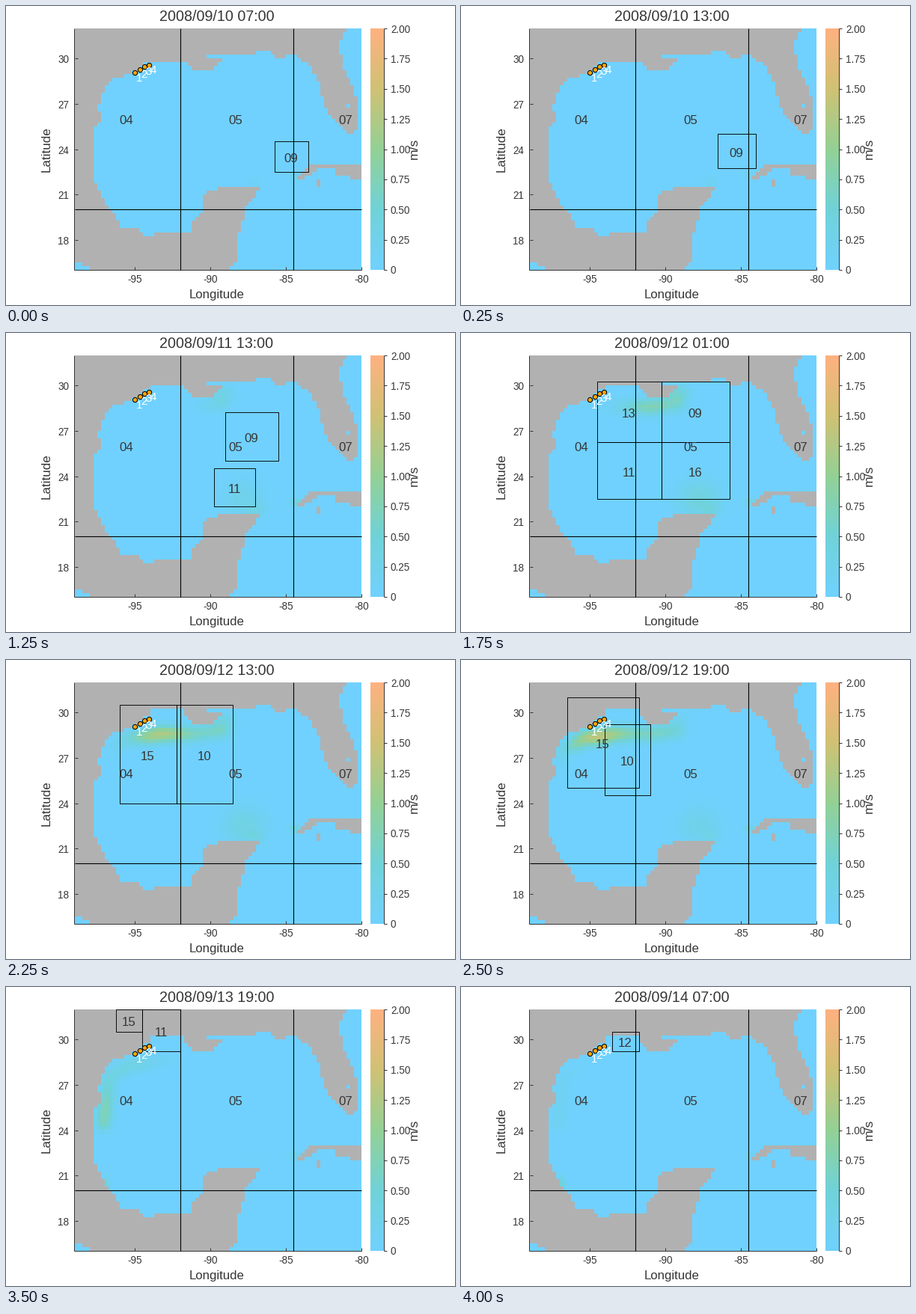
These frames come from a looping animation (600x400 px, 4250 ms). A matplotlib script:

```python
import numpy as np
import matplotlib.pyplot as plt
from matplotlib.animation import FuncAnimation
from matplotlib.colors import LinearSegmentedColormap
from matplotlib.patches import Rectangle
from matplotlib.path import Path

plt.rcParams["font.family"] = "Liberation Sans"
W, H, DPI = 600, 400, 100
FRAMES, STEP_MS = 17, 250
L, R, T, B = 92, 475, 30.5, 353.5
WEST, EAST, SOUTH, NORTH = -99, -80, 16, 32
CELL = 0.25
INK, LAND = "#363636", "#b1b1b1"

speed_map = LinearSegmentedColormap.from_list("speed", [
    "#70d1ff", "#70d3d8", "#93d195", "#d0c274", "#ffb180"])
speed_map.set_bad(LAND)


def px(lon):
    return L + (lon - WEST) * (R - L) / (EAST - WEST)


def py(lat):
    return B - (lat - SOUTH) * (B - T) / (NORTH - SOUTH)


def pixel(v):
    return np.floor(v) + 0.5


# Sea mask: outlines in lon, lat, stepped by the quarter-degree grid
LON, LAT = np.meshgrid(np.arange(WEST, EAST, CELL) + CELL / 2,
                       np.arange(NORTH, SOUTH, -CELL) - CELL / 2)
GULF = [(-86.75, 21.5), (-89, 21.5), (-90.5, 21), (-90.5, 20), (-91.25, 19),
        (-91.25, 18.5), (-93, 18.5), (-94.5, 18.25), (-95, 18.75),
        (-96, 18.75), (-96.25, 19.5), (-97, 20.4), (-97.75, 22),
        (-97.75, 25.25), (-97.2, 25.8), (-97.45, 26.7), (-97, 28.2),
        (-96.2, 28.75), (-95.4, 29), (-94.25, 29.75), (-91.75, 29.75),
        (-91.2, 29.25), (-89.75, 29.25), (-89.25, 30), (-90.25, 30),
        (-90.25, 30.25), (-87.25, 30.25), (-87, 30.5), (-86, 30.5),
        (-85.5, 30), (-84.5, 30.25), (-83.4, 29.5), (-82.75, 28.2),
        (-82.5, 26.8), (-81, 25), (-80.25, 25.25), (-80.25, 27.3),
        (-81.25, 29.5), (-81.5, 31), (-81, 32), (-80, 32), (-80, 16),
        (-88.8, 16), (-88.25, 16.5), (-88.25, 18.25), (-87.75, 19.5),
        (-87.75, 20.2), (-87, 20.8)]
CUBA = [(-84.25, 22), (-84, 22.5), (-83.25, 23), (-80, 23), (-80, 22),
        (-81.7, 22.3), (-81.9, 22.75), (-83, 22.75), (-83.2, 22.25)]


def inside(outline):
    points = np.c_[LON.ravel(), LAT.ravel()]
    return Path(outline).contains_points(points).reshape(LON.shape)


def block(west, east, south, north):
    return (LON > west) & (LON < east) & (LAT > south) & (LAT < north)


lake = block(-81, -80.75, 26.75, 27)
pacific = block(-99, -98, 16, 16.25) | block(-99, -98.5, 16, 16.5)
isle = block(-83, -82.75, 21.5, 22)
water = (inside(GULF) | lake | pacific) & ~inside(CUBA) & ~isle

# Surge: a pulse running west along the shelf, with a weaker wake
SHELF = np.array([(-89.3, 28.8), (-91, 28.6), (-93.2, 28.6), (-95.4, 28.3),
                  (-96.7, 27.5), (-96.9, 26), (-97.1, 24.5)])
knots = np.r_[0, np.cumsum(np.hypot(*np.diff(SHELF, axis=0).T))]
arc = np.linspace(0, knots[-1], 150)
shelf_lon, shelf_lat = (np.interp(arc, knots, c) for c in SHELF.T)
dist = np.hypot(LON[..., None] - shelf_lon, LAT[..., None] - shelf_lat)
along = arc[dist.argmin(-1)]
across = dist.min(-1)

# Local eddies: lon, lat, widths, peak speed, peak step, duration
EDDIES = [(-87.8, 22.5, 1.0, 0.9, 0.45, 7.5, 2.5),
          (-87.0, 21.8, 0.4, 0.3, 0.25, 6, 5),
          (-84.4, 22.3, 0.3, 0.2, 0.45, 8, 7),
          (-89.2, 29.5, 0.6, 0.4, 0.45, 7, 2),
          (-96.9, 20.4, 0.2, 0.4, 0.50, 15.5, 2)]


def bell(x, mid, width):
    return np.exp(-((x - mid) / width) ** 2 / 2)


def field(i):
    head = 1.7 + 1.2 * (i - 7)
    power = 1.35 * bell(i, 10.5, 3.2)
    v = power * bell(across, 0, 0.4) * (
        bell(along, head, 1.5) + 0.45 * bell(along, head - 4, 1.6))
    for lon, lat, sx, sy, peak, when, span in EDDIES:
        v += peak * bell(i, when, span) * bell(LON, lon, sx) * bell(LAT, lat, sy)
    flood = block(-94, -91.75, 29.5, 29.75 + CELL * min(2, i // 4))
    return np.ma.masked_where(~(water | flood), v)


# Nested patches at key steps: label, west, north, east, south
PATCHES = {
    0: [("09", -85.75, 24.5, -83.5, 22.5)],
    3: [("09", -88, 26.25, -85, 23.5), ("11", -85, 23, -83.75, 21.75)],
    7: [("09", -90.25, 30.25, -85.75, 26.25), ("11", -94.5, 26.25, -90.25, 22.5),
        ("13", -94.5, 30.25, -90.25, 26.25), ("16", -90.25, 26.25, -85.75, 22.5)],
    9: [("15", -96, 30.5, -92.25, 24), ("10", -92.25, 30.5, -88.5, 24)],
    12: [("15", -97.75, 32, -91, 26.75), ("10", -97.75, 26.75, -96, 25.25)],
    14: [("15", -96.25, 32, -94.5, 30.5), ("11", -94.5, 32, -92, 29.25)],
    16: [("12", -93.5, 30.5, -91.75, 29.25)],
}


def patches(i):
    """Drift each patch toward the next key layout, snapped to the grid."""
    a = max(k for k in PATCHES if k <= i)
    b = min(k for k in PATCHES if k >= i)
    f = (i - a) / max(b - a, 1)
    goal = PATCHES[b]
    for k, (name, *edges) in enumerate(PATCHES[a]):
        ends = goal[min(k, len(goal) - 1)][1:]
        mix = (1 - f) * np.array(edges) + f * np.array(ends)
        yield name, np.round(mix / CELL) * CELL


fig = plt.figure(figsize=(W / DPI, H / DPI), dpi=DPI, facecolor="white")
ax = fig.add_axes([0, 0, 1, 1])
ax.axis("off")


def label(x, y, s, size, color=INK, **kw):
    kw = {"ha": "center", "va": "center_baseline", "zorder": 4, **kw}
    return ax.text(x, y, s, fontsize=size * 72 / DPI, color=color, **kw)


def line(x0, y0, x1, y1, color=INK, width=1):
    ax.plot(pixel([x0, x1]), pixel([y0, y1]), color=color, snap=False,
            lw=width * 72 / DPI, zorder=3, solid_capstyle="butt")


def heat(data, extent):
    return ax.imshow(data, cmap=speed_map, vmin=0, vmax=2, extent=extent,
                     aspect="auto", interpolation="nearest")


sea = heat(field(0), (L, R, B, T))
heat(np.linspace(2, 0, 256)[:, None], (487, 505, B, T))
ax.set_xlim(0, W)
ax.set_ylim(H, 0)

# Axes, ticks and colour bar
line(91, T, 91, B)
line(91, B, R, B)
line(505, T, 505, B)
for lon in range(-95, -79, 5):
    line(px(lon), B - 4, px(lon), B)
    label(px(lon), 364.5, f"{lon}", 13.5)
for lat in range(18, 31, 3):
    line(L, py(lat), L + 4, py(lat))
    label(84.5, py(lat), f"{lat}", 13.5, ha="right")
for speed in np.arange(0, 2.1, 0.25):
    y = B - speed / 2 * (B - T)
    line(505, y, 509, y)
    label(514, y - 0.5, f"{speed:.2f}" if speed else "0", 13.5, ha="left")
label(281.5, 385, "Longitude", 16.8)
label(54.5, 191.5, "Latitude", 17, rotation=90, va="center")
label(545, 191, "m/s", 17.5, rotation=90, va="center")

# Fixed regions
for lon in (-92, -84.5):
    line(px(lon), T, px(lon), B, "black", 1.1)
line(L, py(20), R, py(20), "black", 1.1)
for x, name in ((160.5, "04"), (307, "05"), (454, "07")):
    label(x, 152.5, name, 16.8)

# Stations
stations = [(172, 89.3), (178.7, 85), (185, 80.7), (190.5, 79)]
ax.scatter(*zip(*stations), s=(6.2 * 72 / DPI) ** 2, color="#ffa500",
           edgecolors="black", linewidths=0.75, zorder=5)
for n, (x, y) in enumerate(stations, 1):
    label(x + 6, y + 6, str(n), 15, "white", zorder=6)

title = label(281.5, 12.5, "", 19.7)
boxes = [ax.add_patch(Rectangle((0, 0), 1, 1, fill=False, ec="black", snap=False,
                                lw=0.65, zorder=3)) for _ in range(4)]
names = [label(0, 0, "", 16.8) for _ in range(4)]


def update(i):
    hours = 7 + 6 * i
    title.set_text(f"2008/09/{10 + hours // 24} {hours % 24:02d}:00")
    sea.set_data(field(i))
    for artist in boxes + names:
        artist.set_visible(False)
    for box, name, (text, (w, n, e, s)) in zip(boxes, names, patches(i)):
        x0, x1 = pixel(px(w)), pixel(px(e))
        y0, y1 = pixel(py(n)), pixel(py(s))
        box.set_bounds(x0, y0, x1 - x0, y1 - y0)
        name.set_text(text)
        name.set_position(((x0 + x1) / 2 - 1, (y0 + y1) / 2 + 1))
        box.set_visible(True)
        name.set_visible(True)
    return [title, sea, *boxes, *names]


anim = FuncAnimation(fig, update, frames=FRAMES, interval=STEP_MS,
                     init_func=lambda: update(0), repeat=True, repeat_delay=0)
plt.show()
```
